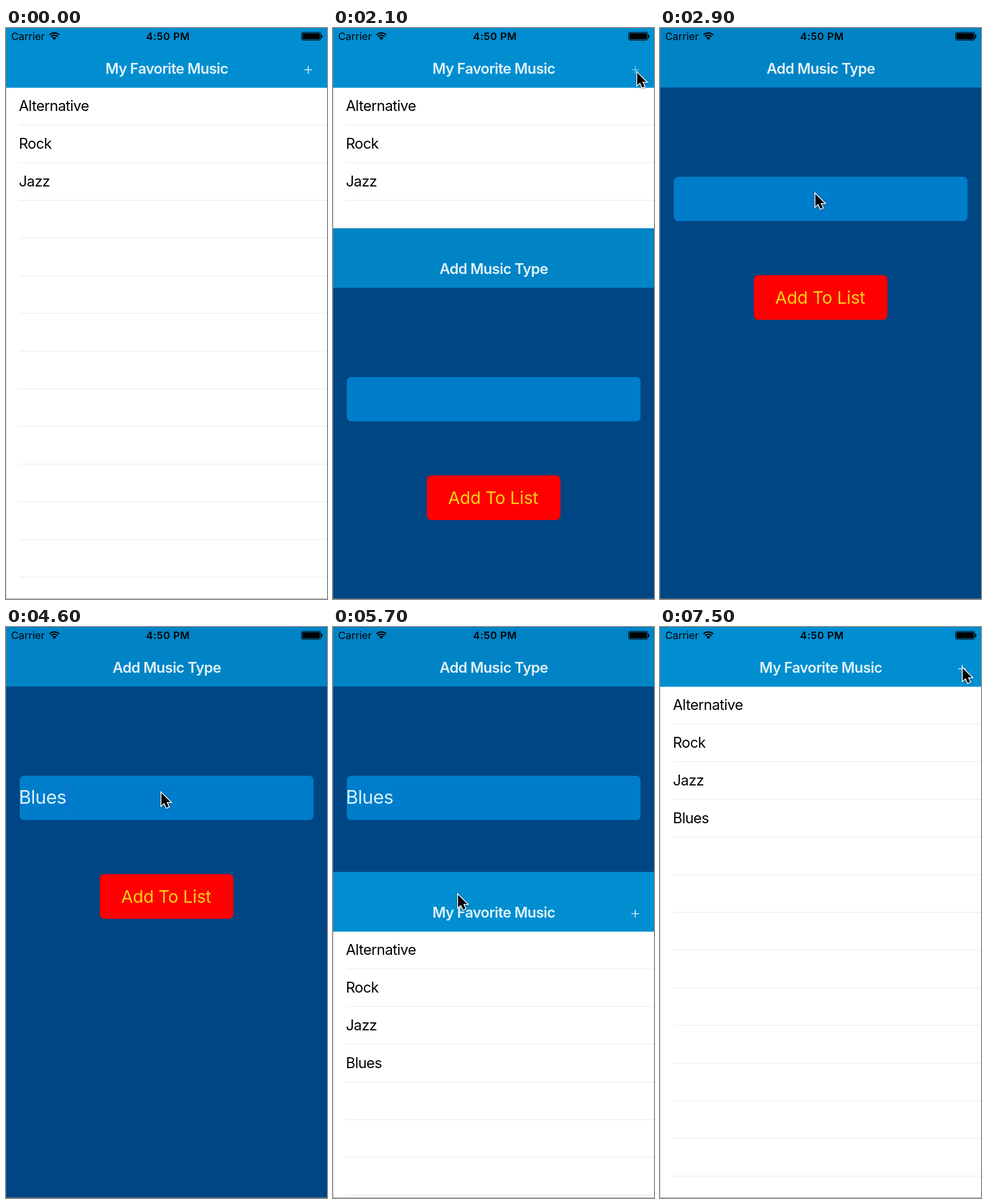
An HTML page for the animation above (8 s loop, 561 by 998 pixels).

```html
<!DOCTYPE html>
<html lang="en">
<head>
<meta charset="utf-8">
<title>Music list</title>
<style>
  html, body { margin: 0; width: 100%; height: 100%; overflow: hidden; background: #fff; }
  svg { display: block; width: 100%; height: 100%; }
  text { font: 25.4px Inter, "Open Sans", sans-serif; letter-spacing: -0.6px; white-space: pre; }
  .title { font-weight: 600; fill: #e0f3f8; text-anchor: middle; }
  .status { font-size: 17.95px; letter-spacing: 0; }
  .clock { font-weight: 600; letter-spacing: 0.5px; text-anchor: middle; }
  .button { font-size: 30px; fill: #f7d117; letter-spacing: -0.15px; text-anchor: middle; }
  .input { font-size: 32.9px; fill: #d6f1fa; letter-spacing: -0.5px; }
  .plus { stroke: #e0f3f8; stroke-width: 1.6; }
  #cursor { filter: drop-shadow(0 1.5px 1.5px rgba(0, 0, 0, .4)); }
</style>
</head>
<body>
<svg viewBox="0 0 561 998">
  <g id="list"></g>

  <g id="form">
    <rect width="561" height="998" fill="#004684"/>
    <rect width="561" height="104" fill="#0084c6"/>
    <text class="title" x="281" y="80">Add Music Type</text>
    <rect x="24" y="260" width="513.5" height="77.5" rx="8" fill="#007dca"/>
    <text class="input" id="typed" x="22.5" y="309"></text>
    <rect id="caret" y="277" width="2.4" height="42" fill="#2e5df0"/>
    <rect x="164" y="432" width="233.5" height="78" rx="8" fill="#f00"/>
    <text class="button" x="280" y="482">Add To List</text>
  </g>

  <g id="updated"></g>

  <g id="statusbar">
    <text class="status" x="9" y="21">Carrier</text>
    <path d="M84.5 21l-3.6-3.7a5.1 5.1 0 0 1 7.2 0z"/>
    <path d="M78.8 15.1a8 8 0 0 1 11.4 0M76 12.2a12 12 0 0 1 17 0" fill="none" stroke="#000" stroke-width="2.3"/>
    <text class="status clock" x="283" y="21">4:50 PM</text>
    <rect x="516.5" y="7.5" width="33.5" height="14" rx="2.5" fill="none" stroke="#000"/>
    <rect x="518" y="9" width="30.5" height="11" rx="1"/>
    <path d="M551 12a3 3 0 0 1 0 5.5z" stroke="#000"/>
  </g>

  <g fill="#888">
    <rect width="1" height="998" opacity=".35"/>
    <rect y="997" width="561" height="1" opacity=".8"/>
  </g>

  <path id="cursor" d="M0 0V22L5 17.5L9 26L13 24.3L9.2 16H16Z" stroke="#fff" stroke-width="3" paint-order="stroke"/>
</svg>

<script>
const LOOP = 8000, STEP = 100, HEIGHT = 998;
const ROW = 65.85;
const byId = id => document.getElementById(id);

function listScreen(names) {
  let rows = '';
  for (let i = 0; i < 13; i++) {
    rows += `<rect x="23" y="${169 + i * ROW}" width="538" height="1.2" fill="#ececee"/>`;
    if (names[i]) rows += `<text x="22.4" y="${145 + i * ROW}">${names[i]}</text>`;
  }
  return `<rect width="561" height="998" fill="#fff"/>
    <rect width="561" height="104.5" fill="#008ed1"/>
    <text class="title" x="281" y="80">My Favorite Music</text>
    <path class="plus" d="M521.5 73h13.5M528.3 66.3v13.4"/>${rows}`;
}

const genres = ['Alternative', 'Rock', 'Jazz'];
byId('list').innerHTML = listScreen(genres);
byId('updated').innerHTML = listScreen([...genres, 'Blues']);
const plus = byId('list').querySelector('.plus');

// time, x, y of the pointer tip
const pointerPath = [
  [900, 575, 300], [1450, 531.5, 78],
  [2250, 531.5, 78], [2800, 271.5, 290],
  [4650, 271.5, 290], [5250, 218.5, 468],
  [5700, 218.5, 468], [6000, 242.5, 486], [6300, 252, 526],
  [6400, 252, 526], [7300, 526, 73], [7400, 526, 73], [7500, 529, 72]
];
const keyTimes = [3800, 4000, 4100, 4200, 4400];

function pointerAt(t) {
  const next = pointerPath.findIndex(p => p[0] > t);
  if (next === 0) return [600, 300];
  if (next < 0) return pointerPath.at(-1).slice(1);
  const [t0, x0, y0] = pointerPath[next - 1], [t1, x1, y1] = pointerPath[next];
  const u = (t - t0) / (t1 - t0), e = u * u * (3 - 2 * u);
  return [x0 + (x1 - x0) * e, y0 + (y1 - y0) * e];
}

// Critically damped spring that brings a sheet up from below the stage.
function sheetTop(t, start) {
  const x = Math.max(0, t - start) * 0.0176;
  return Math.round(HEIGHT * (1 + x) * Math.exp(-x));
}

const moveTo = (id, x, y) => byId(id).setAttribute('transform', `translate(${x} ${y})`);

function draw(t) {
  moveTo('form', 0, sheetTop(t, 1974));
  moveTo('updated', 0, sheetTop(t, 5591));
  moveTo('cursor', ...pointerAt(t));
  plus.style.opacity = t >= 1900 ? 0.5 : 1;

  const typed = byId('typed'), caret = byId('caret');
  typed.textContent = 'Blues'.slice(0, keyTimes.filter(k => k <= t).length);
  const width = typed.textContent ? typed.getComputedTextLength() : 0;
  caret.setAttribute('x', 23 + width);
  caret.style.opacity = t >= 3600 && t < 5000 ? 0.8 : 0;
}

function tick() {
  const t = performance.now() % LOOP;
  draw(Math.floor(t / STEP) * STEP);
  requestAnimationFrame(tick);
}
tick();
</script>
</body>
</html>
```
